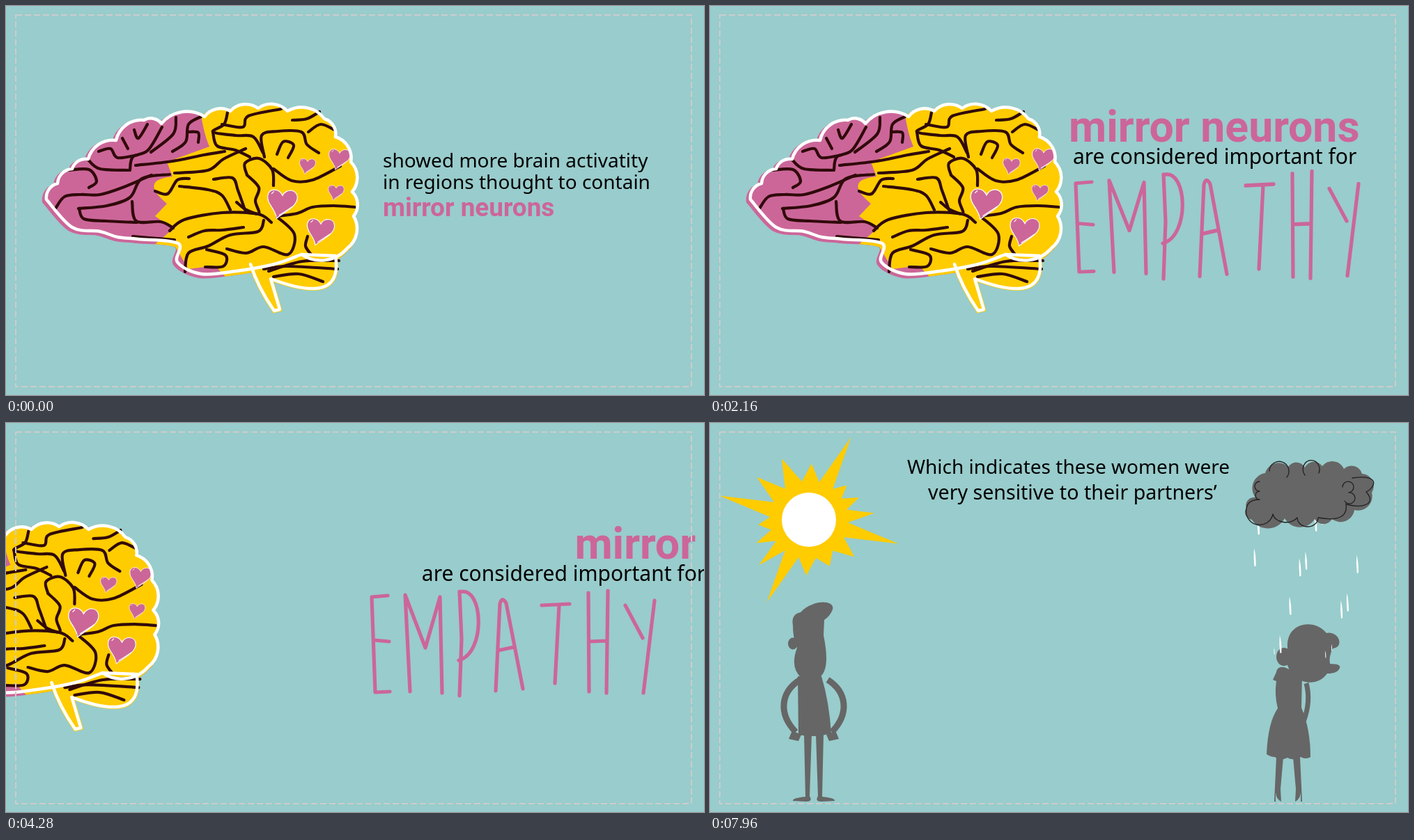
Animation of 1002x559 px, one loop 8 s. Source, as an HTML page:

```html
<!DOCTYPE html>
<html lang="en">
<head>
<meta charset="utf-8">
<title>Mirror neurons</title>
<style>
  html, body { margin: 0; width: 100%; height: 100%; overflow: hidden; background: #9cc; }
  svg { display: block; width: 100vw; height: 100vh; }
  text { font: 28px "Noto Sans", "Open Sans", sans-serif; white-space: pre; }
  #mirror { font: bold 62.6px Roboto, Inter, sans-serif; fill: #c69; }
  .line { fill: none; stroke-linecap: round; stroke-linejoin: round; }
  #folds { stroke: #300a0a; stroke-width: 4.2; }
  #outline { stroke: #fff; stroke-width: 4.5; }
  #empathy { stroke: #c69; stroke-width: 5.2; }
  .grey { fill: #666; }
  .limb { stroke: #666; fill: none; }
</style>
</head>
<body>
<svg viewBox="0 0 1002 559">
  <defs>
    <g id="heart">
      <path fill="#c69" stroke="#fff" stroke-width="1.2" d="M-9 22C-10 8 -24 0 -22 -12S-5 -23 0 -12C5 -23 22 -22 22 -9S4 12 -9 22Z"/>
      <path class="line" stroke="#fff" stroke-width="1.2" d="M-5 17Q8 9 15 4M-16 -15l3 -3"/>
    </g>
    <path id="rim"/>
    <path id="stem" d="M424 357 473 359Q480 405 442 406 420 407 380 392L393 436 385 438Q362 405 351 371"/>
    <clipPath id="rear"><path d="M276 120Q280 175 292 202L231 224 239 245Q190 250 231 284L214 302 240 320 205 350 243 346 262 378 300 373 325 400H520V120Z"/></clipPath>
    <clipPath id="belowCloud"><rect x="700" y="135" width="400" height="300"/></clipPath>
  </defs>

  <g id="brain">
    <g stroke-width="6">
      <use href="#rim" x="-3" y="3" fill="#c69" stroke="#c69"/>
      <g clip-path="url(#rear)"><use href="#rim" x="-3" y="3" fill="#fc0" stroke="#fc0"/></g>
      <use href="#stem" fill="#fc0" stroke="#fc0"/>
    </g>

    <g id="folds" class="line">
      <path d="M89 236 119 235 130 252 119 261"/>
      <path d="M71 291 84 274 107 271 135 271 167 261 209 243"/>
      <path d="M118 221 135 234 178 236"/>
      <path d="M133 209 150 205 160 218 189 214"/>
      <path d="M167 190 175 205M178 235"/>
      <path d="M178 235 182 217 204 207 224 174"/>
      <path d="M184 178 190 190 203 170"/>
      <path d="M244 160 240 184 208 210"/>
      <path d="M280 159 262 170 258 195 239 209"/>
      <path d="M261 181 276 182 276 196"/>
      <path d="M105 291 112 306 145 309 188 311"/>
      <path d="M104 291 145 287 178 275 195 248 235 242"/>
      <path d="M181 281 187 309 222 310 240 319"/>
      <path d="M182 331 205 333 242 336"/>
      <path d="M186 229 239 223 284 214 314 209"/>
      <path d="M242 240 290 236 312 220 344 205"/>
      <path d="M297 181 303 201 329 207 350 217"/>
      <path d="M318 153 313 170 297 181 330 186 355 188 369 211"/>
      <path d="M310 170 340 174 348 158 395 148"/>
      <path d="M371 217 367 186 390 180 424 181 432 199 449 211"/>
      <path d="M389 213 398 195 413 200 405 218"/>
      <path d="M411 164 432 162 450 152"/>
      <path d="M434 181 452 170 473 179"/>
      <path d="M346 243 343 226 363 219 382 235 384 258"/>
      <path d="M346 243 363 261 358 280 363 298 345 293 331 282"/>
      <path d="M384 234 410 251 440 250 480 230"/>
      <path d="M298 249 325 247 333 265 343 293"/>
      <path d="M249 259 290 264 310 272 322 293"/>
      <path d="M214 266 232 270 246 250 263 248"/>
      <path d="M235 323 256 307 310 297 362 299 381 311"/>
      <path d="M257 382 262 355 290 345 322 329 362 324 370 308"/>
      <path d="M262 332 285 323 310 322 341 318"/>
      <path d="M286 375 312 374 315 358 288 350"/>
      <path d="M317 349 345 355 370 346 405 357 414 328 389 303"/>
      <path d="M389 302 418 298 440 289 470 287 501 289"/>
      <path d="M433 331 430 345 438 357"/>
      <path d="M370 378 404 374 476 378"/>
      <path d="M377 381 425 367 478 366"/>
      <path d="M384 389 420 385 455 396"/>
    </g>

    <g id="hearts">
      <use href="#heart" transform="translate(397 284)"/>
      <use href="#heart" transform="translate(479 220) scale(.72)"/>
      <use href="#heart" transform="translate(433 230) scale(.54)"/>
      <use href="#heart" transform="translate(474 268) scale(.53)"/>
      <use href="#heart" transform="translate(452 324) scale(.92)"/>
    </g>

    <g id="outline" class="line"><use href="#rim"/><use href="#stem"/></g>
  </g>

  <text id="showed" x="541" y="232">showed more brain activatity</text>
  <text id="regions" x="541" y="263">in regions thought to contain</text>
  <text id="mirror">mirror neurons</text>
  <text id="important" x="521" y="227" style="font-size:30px">are considered important for</text>
  <g id="empathy" class="line">
    <path d="M548 248L525 250L530 387L551 386M528 312L550 314"/>
    <path d="M580 386L573 247L602 323L623 250L626 388"/>
    <path d="M651 242L654 310L651 392M651 243C685 232 690 330 650 341"/>
    <path d="M703 385L709 260Q712 248 718 259L742 382M706 327L729 322"/>
    <path d="M769 262L809 260M794 262L788 374"/>
    <path d="M836 244L837 386M864 241L862 388M837 314L863 313"/>
    <path d="M889 262L914 309M931 255L915 388"/>
  </g>

  <text id="which" x="283" y="73">Which indicates these women were</text>
  <text id="very" x="313" y="110" style="font-size:28.6px">very sensitive to their partners’</text>

  <g id="sun"><polygon id="rays" fill="#fc0"/><circle r="39" fill="#fff"/></g>

  <g id="man" class="grey">
    <path d="M119 291Q116 275 130 272C150 252 180 255 176 268Q172 278 164 283L163 305C170 340 168 358 156 367H132Q114 352 125 323Q119 310 119 291Z"/>
    <ellipse cx="119" cy="317" rx="7" ry="8.5"/>
    <path d="M126 364H160Q171 400 174 446 150 453 127 448Z"/>
    <g id="side">
      <path class="limb" stroke-width="9" d="M129 369C101 387 98 418 123 444"/>
      <path d="M118 442L131 448 127 457 113 454ZM135 447H146L143 536Q148 544 138 544L119 543Q118 539 137 537Z"/>
    </g>
    <use href="#side" transform="translate(298) scale(-1 1)"/>
  </g>

  <g id="woman" class="grey">
    <path d="M829 322C827 286 868 280 885 302 902 298 912 322 894 324Q888 336 890 346 906 346 904 352 901 360 886 360C870 382 837 374 829 348Z"/>
    <ellipse cx="824" cy="336" rx="11" ry="13"/>
    <path d="M813 358C814 349 824 350 827 352L850 362 849 409Q862 440 862 480 855 484 848 480 838 486 829 481 818 486 811 480 805 480 799 476 801 430 815 410 810 390 813 371L808 369Z"/>
    <path class="limb" stroke-width="7" d="M856 374Q863 400 852 429"/>
    <path id="leg" d="M813 480H823L819 526 820 544Q813 541 812 531V544H810Z"/>
    <use href="#leg" transform="translate(1660) scale(-1 1)"/>
  </g>

  <g id="rain" fill="#fff" clip-path="url(#belowCloud)"></g>

  <g id="cloud">
    <path id="puffs" class="grey"/>
    <path class="line" stroke="#222" stroke-width="1.3" d="M803 69a14 14 0 1 1 25 9M854 75a12 13 0 1 1 20-3M789 84a7 7 0 0 0 0 14a6 6 0 0 0 0 12q-17 0-19 13a16 16 0 0 0 38 8a19 14 0 0 0 35 5a15 13 0 0 0 30 0q44 8 40-20M908 92a8 8 0 1 1 9 8a8 8 0 1 1-6 12M922 79c45-6 30 16 20 20c16 18-6 24-28 18"/>
  </g>

  <rect x="14" y="13" width="970" height="534" fill="none" stroke="#ccc" stroke-width="2" stroke-dasharray="9 4"/>
</svg>

<script>
const LOOP = 8000, STEP = 40;
const $ = id => document.getElementById(id);
const clamp = v => Math.min(1, Math.max(0, v));
const mix = (a, b, k) => a + (b - a) * k;
const fract = v => v - Math.floor(v);
const ramp = (t, start, length) => clamp((t - start) / length);
const ease = p => p < .5 ? 2 * p * p : 1 - 2 * (1 - p) ** 2;
const tween = (t, start, length) => ease(ramp(t, start, length));
const shift = (id, x, y = 0) => $(id).setAttribute('transform', `translate(${x} ${y})`);

const points = text => text.match(/\d+ \d+/g).map(pair => pair.split(' ').map(Number));

// Curve through every point.
const smooth = list => list.slice(1).map((b, i) => {
  const a = list[i], before = list[i - 1] || a, after = list[i + 2] || b;
  const c = a.map((v, n) => v + (b[n] - before[n]) / 6);
  const d = b.map((v, n) => v - (after[n] - a[n]) / 6);
  return `C${c} ${d} ${b}`;
}).join('');

// One outward bump between each pair of points.
const scallop = (list, roundness) => list.slice(1).map((b, i) => {
  const r = roundness * Math.hypot(b[0] - list[i][0], b[1] - list[i][1]);
  return `A${r} ${r} 0 0 1 ${b}`;
}).join('');

const crown = points('58 278 74 255 95 234 118 220 158 193 198 164 223 169 285 159 322 151 362 147 404 151 457 162 473 188 495 224 497 267 499 302 490 348 424 357');
const base = points('424 357 385 371 330 381 280 385 246 368 247 341 190 335 160 332 135 324 95 318 58 278');
$('rim').setAttribute('d', `M${crown[0]}${scallop(crown, .75)}${smooth(base)}Z`);

const puffs = points('770 122 783 107 797 72 830 63 854 64 879 62 910 66 936 73 950 100 925 125 893 138 868 138 825 137 778 139 770 122');
$('puffs').setAttribute('d', `M${puffs[0]}${scallop(puffs, .58)}Z`);

for (const fold of $('folds').children) {
  const list = points(fold.getAttribute('d').split('M')[1]);
  fold.setAttribute('d', `M${list[0]}${smooth(list)}`);
}

const letters = [...$('empathy').children];
const hearts = [...$('hearts').children].map(node => ({ node, place: node.getAttribute('transform') }));

const drops = Array.from({ length: 15 }, (_, i) => {
  const node = document.createElementNS('http://www.w3.org/2000/svg', 'path');
  node.setAttribute('d', 'M-1 -13Q2 -2 1.6 13H-.6Q-2 0 -1 -13Z');
  $('rain').append(node);
  return { node, x: 782 + 156 * fract(i * .618), phase: fract(i * .755) };
});

const SPIKES = 16;
const rays = Array.from({ length: SPIKES * 2 }, (_, n) => {
  const i = n / 2;
  const angle = (-63 + 360 * i / SPIKES - 12 * Math.sin(i * Math.PI / 8) ** 2) * Math.PI / 180;
  const r = n % 2 ? 56 : i % 4 ? 86 + 13 * Math.sin(i * 5) : 133;
  return [r * Math.cos(angle), r * Math.sin(angle)];
});
$('rays').setAttribute('points', rays.join(' '));

function drawSun(t) {
  const x = 142 - 300 * (1 - tween(t, 6459, 800));
  const size = mix(.89, 1, ramp(t, 7000, 960));
  $('sun').setAttribute('transform', `translate(${x} 139) scale(${size})`);
  $('rays').setAttribute('transform', `rotate(${(t - 7960) / 48})`);
}

function drawRain(t, offset) {
  for (const { node, x, phase } of drops) {
    const fall = fract(t / 860 + phase);
    const size = fall > .78 ? .4 : 1;
    node.setAttribute('transform', `translate(${x + offset} ${mix(130, 375, fall)}) scale(${size})`);
  }
}

function draw(t) {
  const leave = tween(t, 3775, 1000);
  shift('brain', -560 * leave, 4 * leave);

  const beat = 1 - .035 * Math.cos(t / 300 * Math.PI);
  for (const { node, place } of hearts) node.setAttribute('transform', `${place} scale(${beat})`);

  shift('showed', 500 * tween(t, 0, 800));
  shift('regions', 500 * tween(t, 120, 800));

  const grow = tween(t, 200, 900);
  const mirrorX = mix(541, 515, grow) + 540 * tween(t, 3750, 1000);
  $('mirror').setAttribute('transform',
    `translate(${mirrorX} ${mix(302, 195, grow)}) scale(${mix(.59, 1, grow)})`);
  shift('important', 500 * (1 - tween(t, 823, 1000)) + 540 * tween(t, 4015, 1000));
  shift('empathy', 500 * (1 - tween(t, 950, 1000)) + 540 * tween(t, 4280, 1000));

  const wobble = t % 600 < 300 ? 0 : .07;
  letters.forEach((letter, i) => {
    const s = 1 - wobble * Math.cos(i * .8);
    letter.setAttribute('transform', `translate(0 ${318 * (1 - s)}) scale(1 ${s})`);
  });

  shift('which', 720 * (1 - tween(t, 4480, 1000)));
  $('very').setAttribute('opacity', ramp(t, 5680, 640));

  drawSun(t);
  shift('man', -250 * (1 - tween(t, 6522, 800)));
  shift('woman', 250 * (1 - tween(t, 6553, 800)));
  const cloudX = 260 * (1 - tween(t, 6389, 800));
  shift('cloud', cloudX);
  drawRain(t, cloudX);
}

const begin = performance.now();
function frame() {
  const t = (performance.now() - begin) % LOOP;
  draw(Math.floor(t / STEP) * STEP);
  requestAnimationFrame(frame);
}
frame();
</script>
</body>
</html>
```
